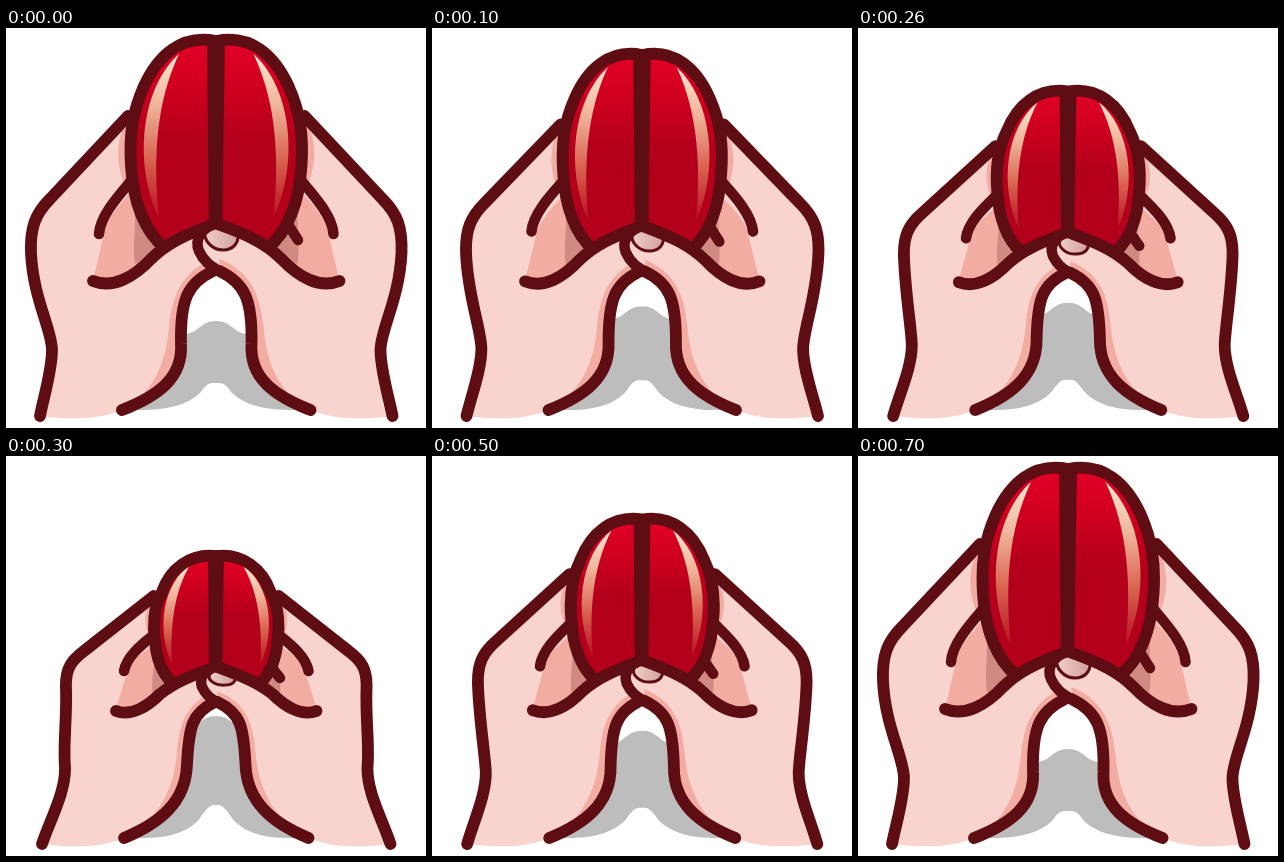
An HTML page that plays this animation: 420 by 400 pixels, repeating every 0.8 s.

```html
<!DOCTYPE html>
<html lang="en">
<head>
<meta charset="utf-8">
<title>Squeezing hands</title>
<style>
html, body { margin: 0; width: 100%; height: 100%; overflow: hidden; background: #fff; }
svg { display: block; width: 100vw; height: 100vh; }
.line { fill: none; stroke: #5e0d12; stroke-width: 11.8; stroke-linecap: round; stroke-linejoin: round; }
.thin { stroke-width: 10.5; }
.skin { fill: #f9d4cf; }
.shade { fill: #f3aca2; }
.deep { fill: #d08a82; }
.red { fill: url(#red); }
.gloss { fill: url(#gloss); }
.seam { fill: #5e0d12; }
.nail { fill: url(#nail); stroke: #5e0d12; stroke-width: 3; }
.shadow { fill: #bdbdbd; }
</style>
</head>
<body>
<svg id="stage" viewBox="0 0 420 400">
  <defs>
    <linearGradient id="red" x2="0" y2="1">
      <stop offset="0" stop-color="#e20026"/>
      <stop offset=".2" stop-color="#d2001f"/>
      <stop offset=".48" stop-color="#b3001b"/>
    </linearGradient>
    <linearGradient id="gloss" x2="0" y2="1">
      <stop offset="0" stop-color="#fde6d2"/>
      <stop offset=".3" stop-color="#f0b79c"/>
      <stop offset=".65" stop-color="#d9624f"/>
      <stop offset="1" stop-color="#b8101f"/>
    </linearGradient>
    <linearGradient id="nail">
      <stop offset="0" stop-color="#f0cdc8"/>
      <stop offset="1" stop-color="#d3a19d"/>
    </linearGradient>
  </defs>
</svg>
<script>
const stage = document.getElementById("stage");
const NS = "http://www.w3.org/2000/svg";
const STEP = 100;
const ORDER = [0, 1, 2, 3, 3, 2, 1, 0];

// How far each pose is from open (0) to squeezed (1), per axis.
const EASE_X = [0, 0.26, 0.6, 1];
const EASE_Y = [0, 0.16, 0.58, 1];
const SHADOW_Y = [0, 0.45, 0.55, 1];
const FINGER_LIFT = [0, -4, -1, 0];

// Pairs of paths with the same commands: open, squeezed. Only absolute M, L, C and Z are used.
const arm = [
  "M34 388 C38 368 46 342 46 322 C46 302 27 270 25 225 C24 200 29 186 44 171 L122 88",
  "M36 388 C43 366 60 336 59 311 C57 290 61 262 60 233 C59 212 66 204 78 195 L148 140"
];
const inner = [
  "M116 382 C152 368 177 350 175 316 C174 271 182 255 207 243",
  "M118 382 C154 367 180 346 181 308 C183 270 186 257 209 246"
];
const thumb = [
  "M87 253 C107 261 128 249 145 231 C160 216 178 207 209 196",
  "M110 255 C125 261 142 250 154 238 C169 226 185 220 209 211"
];
const finger = [
  "M125 153 C113 167 94 188 93 206",
  "M150 177 C138 187 121 199 118 215"
];
const half = [
  "M210 200 L210 13 C175 6 152 28 138 58 C126 85 123 108 125 138 C127 172 138 204 159 220",
  "M210 214 L210 100 C184 97 164 113 156 136 C147 152 147 172 149 184 C150 200 155 216 166 227"
];
const gloss = [
  "M173 26 C135 60 127 135 153 190 C147 130 150 75 173 26 Z",
  "M184 109 C157 128 150 172 166 209 C164 170 168 136 184 109 Z"
];
const tip = [
  "M213 243 C205 238 198 234 193 223 C188 211 196 200 209 196",
  "M211 246 C204 242 200 239 196 231 C193 222 198 214 209 211"
];

const extend = (pair, a, d) => [pair[0] + a, pair[1] + d];
const hand = extend(arm,
  " L150 215 L207 205 L207 243 C182 255 174 271 175 316 C177 350 152 368 116 382 C90 393 60 391 34 388 Z",
  " L160 220 L209 215 L209 246 C186 257 183 270 181 308 C180 346 154 367 118 382 C92 393 62 391 36 388 Z");
const innerShade = extend(inner,
  " L207 231 C172 245 166 273 163 298 C160 338 146 366 116 382 Z",
  " L209 235 C179 247 173 270 171 296 C168 336 150 366 118 382 Z");
const sideShade = [
  "M124 87 C109 110 109 135 120 160 L140 160 Z",
  "M148 141 C137 156 137 168 145 184 L160 184 Z"
];
const palmShade = [
  "M124 165 C110 180 98 195 97 210 L88 249 C110 256 130 248 160 220 Z",
  "M149 188 C136 198 122 204 121 217 L110 252 C126 257 143 250 165 225 Z"
];
const deepShade = [
  "M128 175 C131 195 126 215 129 236 L160 222 Z",
  "M149 196 C150 206 144 222 147 240 L168 224 Z"
];
const thumbSkin = extend(thumb,
  " L207 243 C182 255 174 271 168 300 L100 300 Z",
  " L209 246 C186 257 183 270 176 295 L120 295 Z");
const tipSkin = extend(tip, " L230 208 L238 250 Z", " L232 220 L236 252 Z");
const stub = ["M283 198 L292 212", "M266 212 L274 222"];
const seam = [
  "M201 12 L219 12 L216 202 L203 202 Z",
  "M202 99 L218 99 L216 216 L203 216 Z"
];
const nail = [
  "M199 203 C197 212 206 222 217 222 C227 222 233 215 232 206 C220 198 207 196 199 203 Z",
  "M204 218 C200 224 210 230 219 229 C227 229 231 225 229 219 C219 213 210 211 204 218 Z"
];
const shadow = [
  "M128 382 L160 340 L172 306 C194 308 192 293 210 293 C228 293 226 308 248 306 L260 340 L292 382 C262 383 240 378 226 365 C219 355 217 355 210 355 C203 355 201 355 194 365 C180 378 158 383 128 382 Z",
  "M128 382 L160 340 L172 273 C194 275 192 260 210 260 C228 260 226 275 248 273 L260 340 L292 382 C262 383 238 378 226 362 C217 349 215 349 210 349 C205 349 203 349 194 362 C182 378 158 383 128 382 Z"
];

const parts = [];

function add(pair, className, { mirror = false, easeY = EASE_Y, lift } = {}) {
  const node = document.createElementNS(NS, "path");
  node.setAttribute("class", className);
  if (mirror) node.setAttribute("transform", "translate(420.5) scale(-1 1)");
  stage.append(node);
  const ends = pair[1].match(/[\d.]+/g).map(Number);
  parts.push({ node, start: pair[0], ends, easeY, lift });
}

function addBoth(pair, className, options) {
  add(pair, className, options);
  add(pair, className, { ...options, mirror: true });
}

add(shadow, "shadow", { easeY: SHADOW_Y });
addBoth(hand, "skin");
addBoth(sideShade, "shade");
addBoth(palmShade, "shade");
addBoth(deepShade, "deep");
addBoth(finger, "line thin", { lift: FINGER_LIFT });
addBoth(arm, "line");
add(stub, "line thin");
addBoth(half, "red");
addBoth(gloss, "gloss");
addBoth(half, "line");
add(seam, "seam");

// The right thumb lies over the left one.
addBoth(thumbSkin, "skin");
add(innerShade, "shade");
add(thumb, "line");
add(inner, "line");
add(tipSkin, "skin");
add(innerShade, "shade", { mirror: true });
add(nail, "nail");
add(thumb, "line", { mirror: true });
add(inner, "line", { mirror: true });
add(tip, "line thin");

function draw(pose) {
  for (const { node, start, ends, easeY, lift } of parts) {
    let i = 0;
    const path = start.replace(/[\d.]+/g, text => {
      const from = Number(text);
      const isY = i % 2;
      const amount = (isY ? easeY : EASE_X)[pose];
      const shift = isY && lift ? lift[pose] : 0;
      return (from + (ends[i++] - from) * amount + shift).toFixed(2);
    });
    node.setAttribute("d", path);
  }
}

const begin = performance.now();

function tick() {
  const elapsed = performance.now() - begin;
  draw(ORDER[Math.floor(elapsed / STEP) % ORDER.length]);
  requestAnimationFrame(tick);
}
tick();
</script>
</body>
</html>
```
